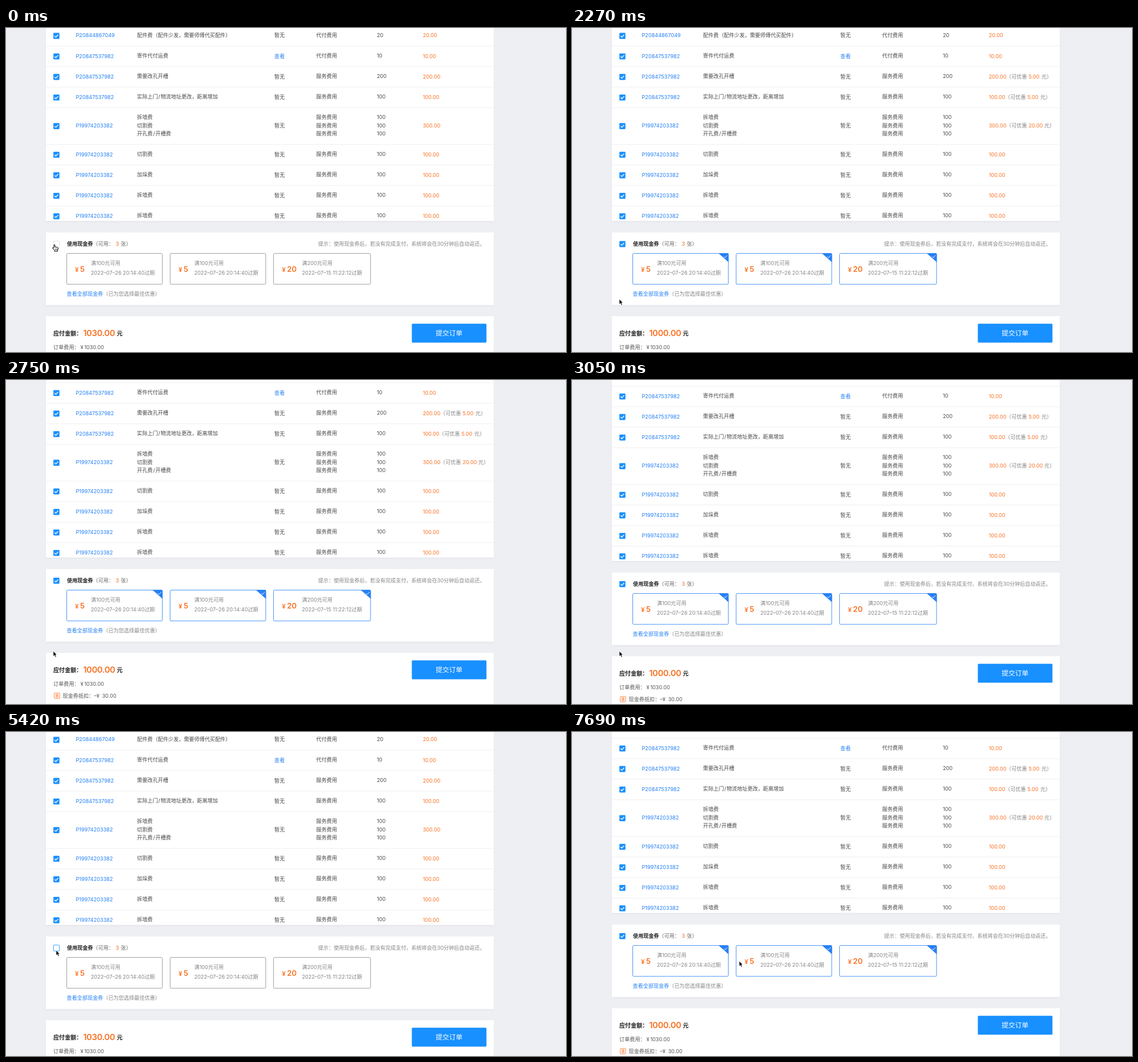
An HTML page for the animation above (7990 ms loop, 983x570 px).

```html
<!DOCTYPE html>
<html lang="zh-CN">
<head>
<meta charset="utf-8">
<title>现金券</title>
<style>
html, body { margin: 0; width: 100%; height: 100%; overflow: hidden; background: #eeeff3; }
svg { display: block; width: 983px; height: 570px; }
text { font-family: Inter, "Noto Sans CJK SC", "Noto Sans CJK", sans-serif; white-space: pre; }
.card { fill: #fff; filter: drop-shadow(0 1px 1px rgba(0, 0, 0, .06)); }
</style>
</head>
<body>
<svg id="stage" viewBox="0 0 983 570"></svg>
<script>
const LOOP = 7990, STEP = 150;
const BLUE = '#1890ff', LINK = '#2680f5', ORANGE = '#fa7022', DARK = '#484848', GREY = '#858585';
const stage = document.getElementById('stage');

// y is the optical middle of the line; slashes get a little air
const text = (x, y, s, fill = DARK, size = 9.13, more = '') =>
  `<text x="${x}" y="${y + size * .36}" fill="${fill}" font-size="${size}" ${more}>` +
  `${s}</text>`.replace(/\/(?!text)/, '<tspan dx=".8" letter-spacing=".8">/</tspan>');
const rect = (x, y, w, h, more) => `<rect x="${x}" y="${y}" width="${w}" height="${h}" ${more}/>`;
const card = (y, h) => rect(70, y, 786.5, h, 'class="card"');
const tick = (x, y, w) =>
  `<path d="M${x - 3} ${y}l2.2 2.3l4-4.4" fill="none" stroke="#fff" stroke-width="${w}"/>`;
const checked = y => rect(83.2, y - 5.2, 10.6, 10.6, `rx="1.3" fill="${BLUE}"`) + tick(88.3, y + .1, 1.3);
const group = (id, body) => `<g id="${id}">${body}</g>`;
const bold = 'font-weight="600"';

const orders = [
  [13.2, 'P20844867049', ['配件费（配件少发，需要师傅代买配件）'], 20, '代付费用'],
  [49.3, 'P20847537982', ['寄件代付运费'], 10, '代付费用'],
  [85.4, 'P20847537982', ['需要改孔开槽'], 200],
  [121.5, 'P20847537982', ['实际上门/物流地址更改，距离增加'], 100],
  [171.9, 'P19974203382', ['拆墙费', '切割费', '开孔费/开槽费'], 100],
  [222.3, 'P19974203382', ['切割费'], 100],
  [258.4, 'P19974203382', ['加垛费'], 100],
  [294.5, 'P19974203382', ['拆墙费'], 100],
  [330.6, 'P19974203382', ['拆墙费'], 100]
];
const row = ([y, id, items, price, kind = '服务费用'], i) => {
  const lines = items.map((item, k) => {
    const ly = y - .6 + (k - (items.length - 1) / 2) * 14.4;
    return text(230, ly, item) + text(544.5, ly, kind) + text(651, ly, price);
  }).join('');
  const bottom = y + 18.2 + (items.length - 1) * 7.2;
  return checked(y + .6) + text(122.5, y, id, LINK) + lines +
    text(471, y, i === 1 ? '查看' : '暂无', i === 1 ? LINK : DARK) +
    text(731.7, y, (price * items.length).toFixed(2), ORANGE) +
    (i < 8 ? rect(70, bottom, 786.5, .8, 'fill="#ececec"') : '');
};
const saving = (x, y, amount, end) =>
  text(x, y, '（可优惠', GREY) + text(x + 39.5, y, amount, ORANGE) + text(end, y, '元）', GREY);

const coupons = [
  [106.6, 167.8, 121.3, 5, 149, 100, '2022–07–26 20:14:40'],
  [288.1, 167.8, 303, 5, 330.5, 100, '2022–07–26 20:14:40'],
  [469.6, 170.3, 484.5, 20, 519.5, 200, '2022–07–15 11:22:12']
];
const couponText = ([, , px, amount, tx, min, date]) =>
  text(px, 424.6, '¥', ORANGE, 11, bold) + text(px + 8.7, 423.8, amount, ORANGE, 13.2, bold) +
  text(tx, 414, `满${min}元可用`, GREY) + text(tx, 430.4, date + '过期', GREY);
const frames = color => coupons.map(([x, w]) =>
  rect(x, 396.6, w, 54.3, `rx="2" fill="none" stroke="${color}" stroke-width=".85"`)).join('');
const corners = coupons.map(([x, w]) =>
  `<path d="M${x + w - 17.3} 396.3h16.2q1.5 0 1.5 1.5v14.3z" fill="${LINK}"/>` + tick(x + w - 5, 402, .9)).join('');
const total = sum => text(135.5, 537, sum, ORANGE, 14.6, bold + ' letter-spacing="-.3"');

const page = card(-60, 399.5) + orders.map(row).join('') +
  card(359.5, 128) +
  text(107, 379.8, '使用现金券', '#222', 9.13, bold) + text(152.5, 379.8, '（可用：', '#666') +
  text(192.5, 379.8, 3, ORANGE, 9.6) + text(201.5, 379.8, '张）', '#666') +
  text(548, 379.3, '提示：使用现金券后，若没有完成支付，系统将会在30分钟后自动返还。', GREY, 9.09) +
  coupons.map(couponText).join('') +
  text(106.5, 467.8, '查看全部现金券', LINK) + text(170.3, 467.8, '（已为您选择最佳优惠）', GREY) +
  card(507, 150) +
  text(83, 537.5, '应付金额：', '#222', 10.1, bold) + text(194.5, 537.5, '元', '#222', 10.1, bold) +
  text(83, 561.7, '订单费用：', '#555') + text(130.8, 561.7, '¥', '#555') + text(137.4, 561.7, '1030.00', '#555') +
  rect(712.4, 520.3, 131, 33.3, `rx="1.5" fill="${BLUE}"`) +
  text(777.8, 537, '提交订单', '#fff', 11.8, 'text-anchor="middle"');

const used = frames(LINK) + corners + total('1000.00') +
  saving(762, 85.4, '5.00', 824) + saving(760, 121.5, '5.00', 822) + saving(762, 171.9, '20.00', 829) +
  rect(84.7, 577.7, 9.6, 9.6, `rx="1" fill="none" stroke="${ORANGE}" stroke-width=".8"`) +
  text(86, 582.4, '惠', ORANGE, 7) +
  text(99.5, 582.4, '现金券抵扣：', '#555') + text(154.5, 582.4, '–¥', '#555') + text(168.7, 582.4, '30.00', '#555');

const arrow = '<path d="M0 0V9.2L2.1 7.2L3.7 10.6L5.3 9.9L3.8 6.6H6.4Z" fill="#000" stroke="#fff" stroke-width=".7"/>';
const hand = '<path d="M-1 .8Q0-.6 1 .8V4.2L5.3 5Q6.8 5.4 6.6 7L5.6 10V11.8H.2V10L-3.3 6.6Q-3.6 5-2.2 5.4L-1 6.4Z" ' +
  'fill="#fff" stroke="#000" stroke-width="1"/><path d="M1.4 7v3M3 7v3M4.5 7v3" stroke="#000" stroke-width=".6"/>';

stage.innerHTML = group('page', page + group('used', used) +
  group('unused', frames('#8c8c8c') + total('1030.00')) +
  rect(83.4, 374.9, 10.4, 10.4, 'id="empty" rx="1.3" fill="#fff" stroke-width=".9"') +
  group('ticked', checked(380))) +
  group('pointer', group('arrow', arrow) + group('hand', hand));

const el = {};
stage.querySelectorAll('[id]').forEach(node => el[node.id] = node);
const show = (node, on) => node.setAttribute('visibility', on ? 'visible' : 'hidden');

// Pointer stops: step, x, y
const path = [
  [0, 85, 381], [3, 88, 380], [11, 88, 380], [15, 83, 477], [20, 83, 477], [25, 91, 362],
  [27, 91, 362], [34, 88, 384], [41, 88, 384], [44, 88, 357], [47, 190, 405], [49, 190, 405], [51, 293.5, 403]
];
const pointerAt = n => {
  const i = path.findIndex(p => p[0] > n);
  if (i < 0) return path[path.length - 1].slice(1);
  const [n0, x0, y0] = path[i - 1], [n1, x1, y1] = path[i];
  const k = (n - n0) / (n1 - n0), e = k * k * (3 - 2 * k);
  return [x0 + (x1 - x0) * e, y0 + (y1 - y0) * e];
};
const isUsed = n => (n >= 2 && n < 7) || (n >= 11 && n < 27) || n >= 37;
const scrollAt = n => {
  if (n >= 38) return 21;
  if (n < 16 || n >= 27) return 0;
  return [20, 30, 27, 23][n - 16] || 21;
};

function draw(now) {
  const n = Math.max(0, Math.floor((now % LOOP - 18) / STEP));
  const on = isUsed(n), ticked = isUsed(n - 1);
  const isHand = n < 12 || n === 37;
  const hover = (n > 0 && n < 12) || n >= 36;
  show(el.used, on);
  show(el.unused, !on);
  show(el.ticked, ticked);
  show(el.empty, !ticked);
  el.empty.setAttribute('stroke', hover ? BLUE : '#dcdcdc');
  show(el.hand, isHand);
  show(el.arrow, !isHand);
  el.page.setAttribute('transform', `translate(0 ${-scrollAt(n)})`);
  el.pointer.setAttribute('transform', `translate(${pointerAt(n)})`);
  requestAnimationFrame(draw);
}
requestAnimationFrame(draw);
</script>
</body>
</html>
```
